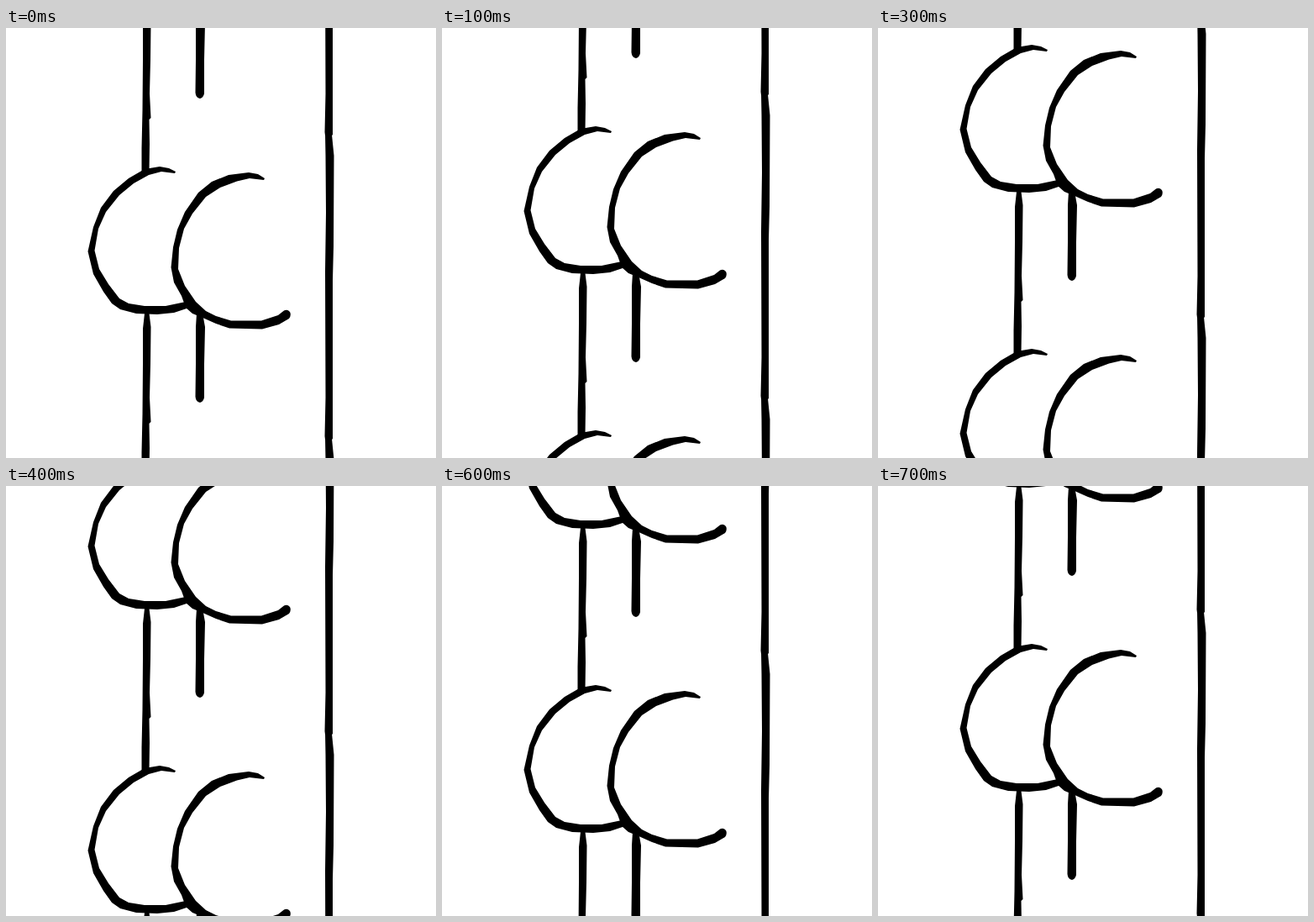
An HTML page that plays this animation: 512 by 512 pixels, repeating every 800 ms.

```html
<!DOCTYPE html>
<html lang="en">
<head>
<meta charset="utf-8">
<title>Scrolling ink lines</title>
<style>
  html, body { margin: 0; width: 100%; height: 100%; overflow: hidden; background: #fff; }
  svg { display: block; width: 100%; height: 100%; }
</style>
</head>
<body>
<svg viewBox="0 0 512 512">
  <defs>
    <g id="tile">
      <!-- left line, short stem, right line -->
      <path d="M165 340H170.500L172.500 356 172 400 171 440 172.500 469 170.500 471 171 500 170.500 533H161.500L161.500 505 162.500 460 163 400 163 358Z"/>
      <path d="M227 340L235 345 237 356 236 400 236 440Q235 445 231 446Q226 445 225.500 439L226 400 226 356Z"/>
      <path d="M380 126L388 127 390.500 152 390 260 389 300 389 489 388 490H380L379.500 486 380.500 440 380 290 381 220 380.500 152Z"/>
      <!-- left arc -->
      <path d="M202 171L194 167 183 165 165 168 146 179 128 194 113 214 104 237 97.500 266 104 293 116 314 126 328 136 335 155 340 180 341 200 339 218 333 214 326 190 331 165 331 146 328 135 322 122 305 111 287 105.500 265 110 239 119 219 135 199 152 185 170 175 185 171 201 173Z"/>
      <!-- right arc -->
      <path d="M308 179L300 174 289 172 265 175 245 183 229 196 213 219 204 240 199 261 196.500 285 200 303 209 319 214 333 222 340 232 344 250 352 266 357.500 305 358.500 325 353 337 346Q340 342 338 338Q335 334.500 331 336.500L324 342 304 348.500 268 348.500 250 343 238 337 226 326 213 307 205 287 206 262 212 239 222 221 238 201 255 190 275 182.500 290 179 307 181Z"/>
    </g>
  </defs>
  <g id="strip">
    <use href="#tile" y="-362"/>
    <use href="#tile"/>
    <use href="#tile" y="362"/>
  </g>
</svg>
<script>
  const strip = document.getElementById('strip');
  const LOOP = 800, STEP = 100, RISE = 48.4;

  function draw(now) {
    const step = Math.floor((now % LOOP) / STEP);
    strip.setAttribute('transform', `translate(0 ${-Math.round(step * RISE)})`);
  }

  let start;
  function tick(now) {
    start ??= now;
    draw(now - start);
    requestAnimationFrame(tick);
  }
  draw(0);
  requestAnimationFrame(tick);
</script>
</body>
</html>
```
